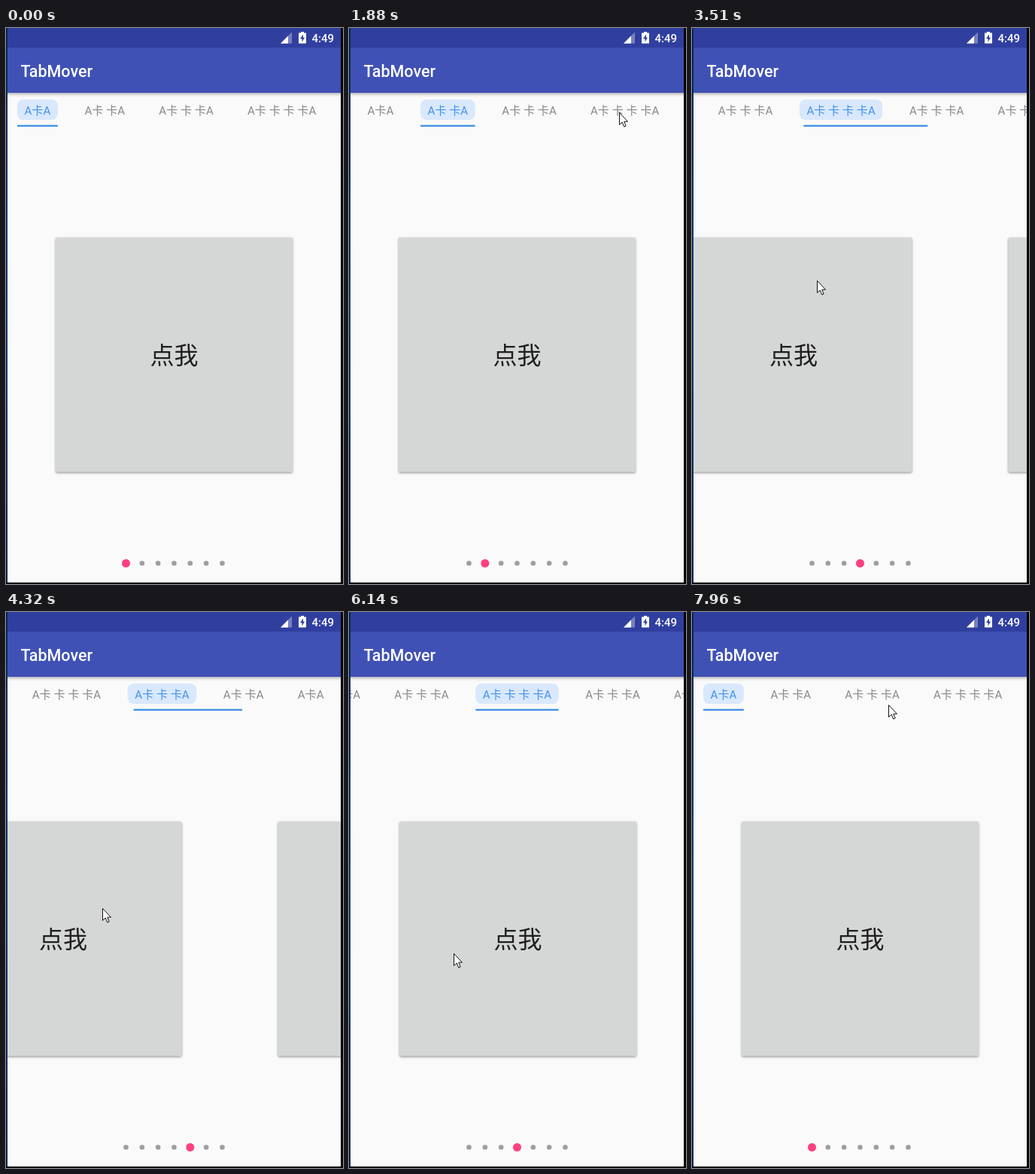
These frames come from a looping animation (448 px wide and 738 px high, 8 s). An HTML page with a canvas:

```html
<!DOCTYPE html>
<html lang="zh-CN">
<head>
<meta charset="utf-8">
<title>TabMover</title>
<style>
html, body { margin: 0; height: 100%; overflow: hidden; background: #000; }
canvas { display: block; width: 448px; height: 738px; }
</style>
</head>
<body>
<canvas id="stage" width="448" height="738"></canvas>
<script>
const c = document.getElementById('stage').getContext('2d');
const LOOP = 8000, LEFT = 2, RIGHT = 445, PAGE = RIGHT - LEFT, MID = (LEFT + RIGHT) / 2;
const FONT = 'Roboto, "Noto Sans CJK SC", "Noto Sans CJK", sans-serif';
const DRAG = 130, HOLD = 30, SETTLE = 400;
const LAG = 23; // the tab strip follows the pager slightly late

// Tabs: content-space left edge and width
const tabs = [];
for (let i = 0, x = 15; i < 7; i++) {
  const n = 3 - Math.abs(i - 3);
  const w = 53.8 + 18.83 * n;
  tabs.push({ x, w, label: 'A卡' + ' 卡'.repeat(n) + 'A' });
  x += w + 26.2;
}
const MAX_SCROLL = tabs[6].x + tabs[6].w + 13 - RIGHT;

// Each gesture: start ms, page it leads to, pages dragged (0 = tap), mouse start
const gestures = [
  [560, 0, 0, 446, 300],
  [740, 1, .3, 300, 340],
  [2510, 3, 0, 359, 111],
  [3355, 4, .2, 255, 335],
  [4218, 5, .42, 275, 393],
  [4909, 4, .35, 95, 436],
  [5360, 3, .3, 132, 436],
  [6140, 2, .33, 138, 453],
  [7540, 0, 0, 39, 111],
  [LOOP, 0, 0, 261, 123]
].map(([t, page, pull, x, y]) => ({ t, page, pull, x, y, free: t + (pull && DRAG + HOLD) }));

const mix = (a, b, u) => a + (b - a) * u;
const clamp = (v, lo, hi) => Math.min(hi, Math.max(lo, v));
const easeOut = (u, power) => 1 - (1 - clamp(u, 0, 1)) ** power;

// Pager position, selected page and mouse: drag, then settle while the mouse moves on
function stateAt(t) {
  const i = Math.max(0, gestures.findLastIndex(g => g.t <= t));
  const g = gestures[i], next = gestures[i + 1];
  const from = i ? gestures[i - 1].page : 0;
  const pulled = Math.sign(g.page - from) * g.pull * clamp((t - g.t) / DRAG, 0, 1);
  const travel = Math.min(1030, .85 * (next.t - g.free));
  const move = easeOut((t - g.free) / travel, 2);
  return {
    page: mix(from + pulled, g.page, easeOut((t - g.free) / SETTLE, 5)),
    selected: t < g.free ? from : g.page,
    x: Math.round(mix(g.x - pulled * PAGE, next.x, move)),
    y: Math.round(mix(g.y, next.y, move))
  };
}

function rect(x, y, w, h, color) {
  c.fillStyle = color;
  c.fillRect(x, y, w, h);
}

function round(x, y, w, h, r, color) {
  c.fillStyle = color;
  c.beginPath();
  c.roundRect(x, y, w, h, r);
  c.fill();
}

function shape(d, color) {
  c.fillStyle = color;
  c.fill(new Path2D(d));
}

function text(s, x, y, size, color, align = 'center', weight = 400) {
  c.font = `${weight} ${size}px ${FONT}`;
  c.textAlign = align;
  c.fillStyle = color;
  c.fillText(s, x, y);
}

function fade(y0, y1, ...colors) {
  const g = c.createLinearGradient(0, y0, 0, y1);
  colors.forEach((color, i) => g.addColorStop(i / (colors.length - 1), color));
  return g;
}

function drawCards(page) {
  for (let i = Math.floor(page); i <= Math.ceil(page); i++) {
    const x = 66 + (i - page) * PAGE;
    c.save();
    c.shadowColor = 'rgba(0,0,0,.4)';
    c.shadowBlur = 3;
    c.shadowOffsetY = 1.3;
    round(x, 278, 315, 311.5, 2, '#d5d7d6');
    c.restore();
    text('点我', x + 157.5, 446, 32, '#1e1e1e');
  }
}

function drawTabs(page, selected) {
  const i = Math.min(5, Math.floor(page)), u = page - i;
  const a = tabs[i], b = tabs[i + 1];
  const center = mix(a.x + a.w / 2, b.x + b.w / 2, u);
  const scroll = clamp(center - MID, 0, MAX_SCROLL);
  tabs.forEach((tab, n) => {
    const x = tab.x - scroll, on = n === selected;
    if (on) round(x, 95, tab.w, 27, 8, '#d9e8fc');
    text(tab.label, x + tab.w / 2, 114.5, 15.1, on ? '#4191ec' : '#88888c');
  });
  const from = mix(a.x, b.x, u * u);
  const to = mix(a.x + a.w, b.x + b.w, easeOut(u, 3.2));
  rect(from - scroll, 128.7, to - from, 2.3, '#4090e8');
}

function drawDots(selected) {
  for (let i = 0; i < 7; i++) {
    const on = i === selected;
    c.fillStyle = on ? '#ff4081' : '#9e9e9e';
    c.beginPath();
    c.arc(159.5 + 21.33 * i, 710.5, on ? 5.5 : 3.3, 0, 7);
    c.fill();
  }
}

function drawBars() {
  rect(LEFT, 86, PAGE, 6, fade(86, 92, 'rgba(0,0,0,.27)', 'rgba(0,0,0,.08)', 'rgba(0,0,0,0)'));
  rect(LEFT, 26, PAGE, 60, '#3f51b5');
  rect(LEFT, 0, PAGE, 26, '#303f9f');
  text('TabMover', 19.5, 64.5, 21.5, '#fff', 'left', 500);
  text('4:49', 406.5, 18.7, 15, '#fff', 'left', 500);
  shape('M365 20.5 380 5.5V20.5Z', 'rgba(255,255,255,.35)');
  shape('M365 20.5 375 10.5V20.5Z', '#fff');
  shape('M389 6.5h3v-1.5h4v1.5h3v14h-10Z', '#fff');
  shape('M395 8.5 391 14.3h2.5V18.5L397 12.7H395Z', '#303f9f');
}

function drawMouse(x, y) {
  c.save();
  c.translate(x, y);
  const arrow = new Path2D('M.5.5V16.5L4.2 13 6.7 19 9.2 18 6.7 12.2H11.5Z');
  c.fillStyle = '#fff';
  c.fill(arrow);
  c.strokeStyle = '#111';
  c.stroke(arrow);
  c.restore();
}

function draw(t) {
  const now = stateAt(t), late = stateAt(Math.max(0, t - LAG));
  rect(0, 0, 448, 738, '#050507');
  rect(0, 0, LEFT, 736, fade(0, 736, '#08264c', '#0a3a70', '#08264c'));
  c.save();
  c.beginPath();
  c.rect(LEFT, 0, PAGE, 736);
  c.clip();
  rect(LEFT, 0, PAGE, 736, '#fafafa');
  drawCards(now.page);
  drawTabs(late.page, now.selected);
  drawDots(now.selected);
  drawBars();
  if (t >= gestures[0].t) drawMouse(now.x, now.y);
  c.restore();
}

const start = performance.now();
function frame() {
  draw((performance.now() - start) % LOOP);
  requestAnimationFrame(frame);
}
frame();
</script>
</body>
</html>
```
